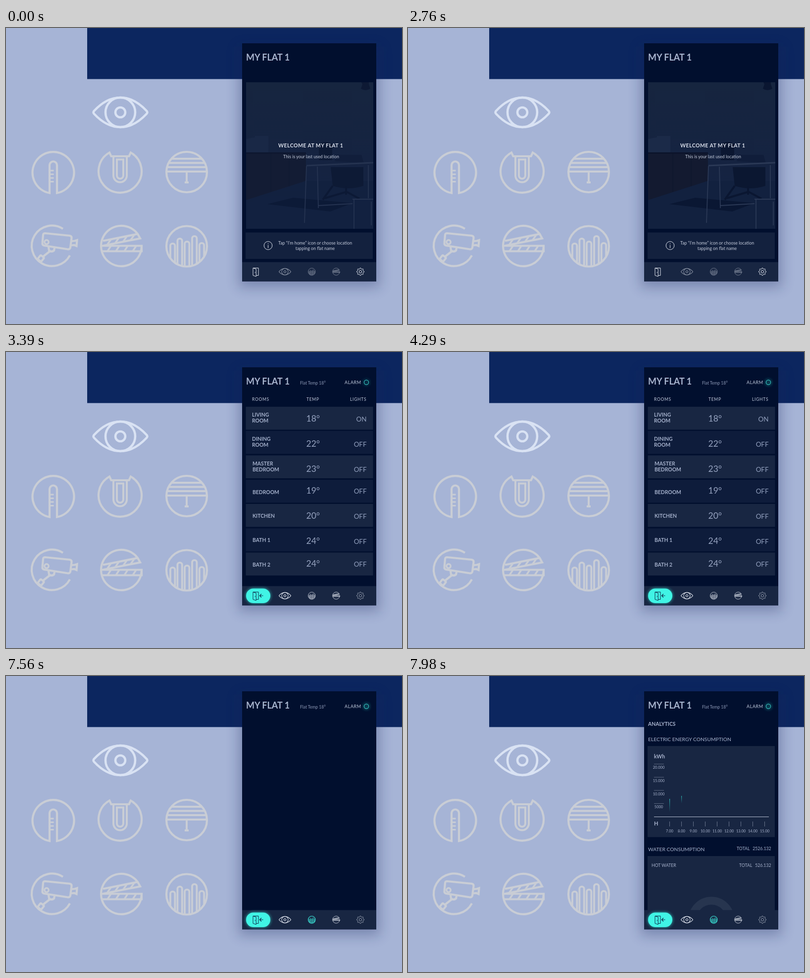
An HTML page for the animation above (8000 ms loop, 800 px wide and 600 px high).

```html
<!DOCTYPE html>
<html lang="en">
<head>
<meta charset="utf-8">
<title>Smart flat app</title>
<style>
html, body { margin: 0; width: 100%; height: 100%; overflow: hidden; background: #a6b4d6; }
svg { display: block; width: 800px; height: 600px; }
text { font-family: Lato, sans-serif; fill: #a9b4ce; }
.b { font-weight: 700; }
.mid { text-anchor: middle; }
.end { text-anchor: end; }
.title { font-size: 18px; }
.head { font-size: 8.5px; letter-spacing: .7px; fill: #c3cbdd; }
.room { font-size: 10.4px; fill: #a3afca; }
.temp { font-size: 17.5px; fill: #97a4c1; }
.light { font-size: 13.4px; fill: #919fbd; }
.sub { font-size: 10.3px; }
.small { font-size: 8.7px; }
.tick { font-size: 7.5px; }
.note { font-size: 8.8px; fill: #c6cddd; }
.icon { fill: none; stroke: #c9cdd5; stroke-width: 4.2; }
.nav { fill: none; stroke: #dfe4ee; stroke-width: 4.8; }
.line { fill: none; stroke: #dfe4ee; stroke-width: 1; }
.grow { transform-box: fill-box; transform-origin: 50% 0; }
</style>
</head>
<body>
<svg viewBox="0 0 800 600">
  <defs>
    <g id="eye">
      <path d="M-53 3Q-56 0-53-3Q-28-30 0-30Q28-30 53-3Q56 0 53 3Q28 30 0 30Q-28 30-53 3Z"/>
      <circle r="30"/><circle r="10"/>
    </g>
    <g id="clapper">
      <path d="M41-2A41 41 0 1 1 33-25L38-16L-38-1M33-25L-37-11M-41-1H41V10H-40"/>
      <path d="M-21-14L-28-4M-5-17L-12-7M11-20L4-10M26-23L19-13M-21-1L-28 10M-4-1L-11 10M13-1L6 10M30-1L23 10" stroke-width="3.6"/>
    </g>
    <g id="bars">
      <circle r="41"/>
      <path d="M-33 24V-1a4.7 4.7 0 0 1 9.4 0V33M-18.600 36V-11a4.700 4.700 0 0 1 9.400 0V40M-4 41V-5a4.700 4.700 0 0 1 9.400 0V40M11 39V-16a4.700 4.700 0 0 1 9.400 0V35M25.800 31V-2a4.700 4.700 0 0 1 9.400 0V21" stroke-width="3.8"/>
    </g>
    <g id="door">
      <path d="M499 486.500H510V501.500H505.500M499 486.500L505.300 488.700V503.700L499 501.500ZM503.300 494.500V496.500"/>
    </g>
    <linearGradient id="wall" x2="0" y2="1">
      <stop stop-color="#16253f"/><stop offset=".55" stop-color="#152341"/><stop offset="1" stop-color="#142344"/>
    </linearGradient>
    <linearGradient id="fade" x2="0" y2="1">
      <stop stop-color="#2fb5b3"/><stop offset="1" stop-color="#2fb5b3" stop-opacity="0"/>
    </linearGradient>
    <filter id="soft" x="-30%" y="-30%" width="160%" height="160%"><feGaussianBlur stdDeviation="13"/></filter>
    <filter id="glow" x="-50%" y="-50%" width="200%" height="200%"><feGaussianBlur stdDeviation="3"/></filter>
  </defs>

  <rect width="800" height="600" fill="#a6b4d6"/>
  <rect x="164" width="636" height="103.500" fill="#0c265f"/>

  <g class="icon">
    <use href="#eye" x="231" y="171" stroke="#d9e2f3" stroke-width="4.600"/>
    <path d="M88 334.500A42 42 0 1 1 103 334.500V278A7.500 7.500 0 0 0 88 278Z"/>
    <path d="M90 289h6.500m-6.500 7.500h6.500m-6.500 7.500h6.500m-6.500 7.500h6.500" stroke-width="3"/>
    <path d="M209 252.500A43.500 43.500 0 1 0 252 252.500L248.500 260H212.500Z"/>
    <path d="M217 260V299A13.500 13.500 0 0 0 244 299V260M224 266.500H237V299A6.500 6.500 0 0 1 224 299Z" stroke-width="4"/>
    <circle cx="365" cy="292" r="41"/>
    <path d="M335 265H395M329 273.500H401M326 282H404M324 291H406M365 291V312M361 313H369" stroke-width="4"/>
    <path d="M115 407A41 41 0 1 0 129 461"/>
    <path d="M79 416L129 421Q133 422 132.500 426L130 445Q129 449 125 448.500L77 441Q73 440 73.500 436L75 419Q75.500 416 79 416ZM133.500 432L139 431.500L143.500 430L142.500 442L138 440L132 440.500M86 444L87 451Q92 455 97 451L98 446M88 453L74 464"/>
    <circle cx="82" cy="434" r="4.200" stroke-width="3.400"/>
    <rect x="-4.500" y="-5" width="9" height="10" rx="1.500" transform="translate(70.500 467)rotate(38)"/>
    <use href="#clapper" x="233" y="442.500"/>
    <use href="#bars" x="365" y="442.500"/>
  </g>

  <rect x="470" y="38" width="285" height="488" fill="#14235a" opacity=".3" filter="url(#soft)"/>
  <rect x="477" y="31" width="271" height="482.500" fill="#010f2e"/>
  <text class="b title" x="485" y="66">MY FLAT 1</text>

  <g id="welcome">
    <rect x="485" y="110" width="257" height="297" fill="url(#wall)"/>
    <g id="photo">
      <path d="M485 252H606V310L485 349Z" fill="#131a30"/>
      <path d="M485 252H606V255H485Z" fill="#0c142b"/>
      <path d="M535 253V332M572 254V321" stroke="#0c142b"/>
      <path d="M485 225l20-4v31h-20zM503 219h27v33h-27z" fill="#1b2a48"/>
      <path d="M485 349L606 310H742V407H485Z" fill="#12213f"/>
      <path d="M528 357L580 344L700 355L655 372Z" fill="#0a1733"/>
      <path d="M718 110h15v4l3 9q-10 6-19 0l3-9z" fill="#0a1631"/>
      <path d="M632 235q14-8 27 0v33h-27zM656 282h66v38q-30 10-62 0z" fill="#0b1731"/>
      <path d="M687 320v18M688 332l-44 13M688 332l26 14M660 320l-20 28" stroke="#0a1631" stroke-width="4"/>
      <path d="M664 270l4-13h50l5 17z" fill="#101d3a"/>
      <path d="M607 279L742 273" stroke="#2b3956" stroke-width="3"/>
      <path d="M607 280L603 395M629 281L631 365M732 278V345M631 360L700 356M700 347H742M703 348V407M738 352V400" fill="none" stroke="#2b3956" stroke-width="1.800"/>
    </g>
    <rect x="484" y="414.500" width="257" height="53.500" fill="#13213e"/>
    <text class="b mid" x="615.700" y="242" font-size="10.600" letter-spacing=".4" style="fill:#d9deea">WELCOME AT MY FLAT 1</text>
    <text class="mid note" x="616.500" y="264">This is your last used location</text>
    <circle class="line" cx="529.500" cy="441" r="8.300"/>
    <path class="line" d="M529.500 440V446M529.500 436.500V438.200" stroke-width="1.300"/>
    <text class="mid note" x="624.500" y="439">Tap “I’m home” icon or choose location</text>
    <text class="mid note" x="624.500" y="450">tapping on flat name</text>
  </g>

  <g id="status">
    <text x="594" y="66" font-size="8.500" style="fill:#8f9bb8">Flat Temp 18°</text>
    <text x="684" y="64.500" font-size="9" letter-spacing=".6" style="fill:#c3cbdd">ALARM</text>
    <circle id="halo" cx="728" cy="61.500" r="5" fill="none" stroke="#2fd0c8" stroke-width="2" filter="url(#glow)"/>
    <circle cx="728" cy="61.500" r="4.600" fill="none" stroke="#35c3bf" stroke-width="1.200"/>
  </g>

  <g id="heads">
    <text class="head" x="497" y="99">ROOMS</text>
    <text class="head" x="607" y="99">TEMP</text>
    <text class="head" x="695" y="99">LIGHTS</text>
  </g>
  <g id="rows"></g>

  <g id="stats">
    <text class="b" x="485" y="100.500" font-size="10.400">ANALYTICS</text>
    <text class="sub" x="485" y="131.500">ELECTRIC ENERGY CONSUMPTION</text>
    <rect x="484" y="142" width="257" height="184.500" fill="#182642"/>
    <text class="b" x="497" y="166.500" font-size="10.400">kWh</text>
    <path d="M497 285.500H729" stroke="#b4bccf"/>
    <text class="b" x="497" y="303" font-size="11">H</text>
    <g id="axes"></g>
    <rect class="grow" id="bar7" x="528" y="249" width="1.200" height="36" fill="url(#fade)"/>
    <rect class="grow" id="bar8" x="552" y="243" width="1.200" height="42" fill="url(#fade)"/>
    <text class="sub" x="485" y="354.500">WATER CONSUMPTION</text>
    <text class="small" x="664" y="353">TOTAL</text>
    <text class="small end" x="733.500" y="353">2526.132</text>
    <rect x="484" y="365" width="257" height="112" fill="#182642"/>
    <text class="small" x="492" y="387">HOT WATER</text>
    <text class="small" x="669" y="387">TOTAL</text>
    <text class="small end" x="733.500" y="387">526.132</text>
    <path d="M574.500 494A38.500 38.500 0 0 1 651.500 494" fill="none" stroke="#27354f" stroke-width="16"/>
  </g>

  <rect x="477" y="474.500" width="271" height="39" fill="#182642"/>
  <use id="doorOff" class="line" href="#door"/>
  <g id="doorOn">
    <rect x="485" y="479.500" width="49" height="29.500" rx="14.750" fill="#3df0e2" opacity=".75" filter="url(#glow)"/>
    <rect x="485" y="479.500" width="49" height="29.500" rx="14.750" fill="#40f4e5"/>
    <use href="#door" fill="none" stroke="#0b2a4a"/>
    <path id="arrow" d="M519.500 494H513M516 490.500L512.500 494L516 497.500" fill="none" stroke="#0b2a4a" stroke-width="1.200"/>
  </g>
  <g id="tools">
    <use class="nav" href="#eye" transform="translate(563.500 494)scale(.22)"/>
    <use class="nav" id="barsOff" href="#bars" transform="translate(617.700 494)scale(.175)"/>
    <use class="nav" href="#clapper" transform="translate(667 494)scale(.175)"/>
  </g>
  <use id="barsOn" class="nav" style="stroke:#40f4e5;stroke-width:6" href="#bars" transform="translate(617.700 494)scale(.175)"/>
  <g id="gear" class="line" transform="translate(716 494)"><circle r="2.700"/></g>
</svg>

<script>
const LOOP = 8000;
const $ = id => document.getElementById(id);

function add(parent, tag, attrs, text) {
  const el = document.createElementNS('http://www.w3.org/2000/svg', tag);
  for (const k in attrs) el.setAttribute(k, attrs[k]);
  if (text) el.textContent = text;
  parent.append(el);
  return el;
}

// steps: [ms, value, easing to the next step]
function play(el, prop, steps, wrap = v => v) {
  const all = [[0, steps[0][1]], ...steps, [LOOP, steps[steps.length - 1][1]]];
  el.animate(all.map(([ms, v, easing = 'linear']) =>
    ({ offset: ms / LOOP, [prop]: wrap(v), easing })), { duration: LOOP, iterations: Infinity });
}
const fade = (id, ...steps) => play($(id), 'opacity', steps);

// name, top, name baseline, temperature, its baseline, light state, slide distance
const rooms = [
  ['LIVING ROOM', 111, 131, 18, 141, 'ON', 0],
  ['DINING ROOM', 160, 180, 22, 191.5, 'OFF', 69],
  ['MASTER BEDROOM', 209.5, 230, 23, 242.5, 'OFF', 69],
  ['BEDROOM', 259, 287.500, 19, 287, 'OFF', 71],
  ['KITCHEN', 308, 336, 20, 337.500, 'OFF', 87],
  ['BATH 1', 357.500, 385, 24, 388.500, 'OFF', 100],
  ['BATH 2', 406.500, 434.500, 24, 435, 'OFF', 62]
];
const easeOut = 'cubic-bezier(.333,.667,.667,1)';

rooms.forEach(([name, top, base, temp, tempBase, light, slide], i) => {
  const row = add($('rows'), 'g', {});
  $('rows').prepend(row);
  add(row, 'rect', { x: 484.5, y: top, width: 257, height: 46.5, fill: i % 2 ? '#0e1c3b' : '#182642' });
  const lines = name.startsWith('BATH') ? [name] : name.split(' ');
  lines.forEach((s, n) => add(row, 'text', { class: 'b room', x: i < 2 ? 497 : 498, y: base + n * 12.2 }, s));
  add(row, 'text', { class: 'temp', x: 606.5, y: tempBase }, temp + '°');
  add(row, 'text', { class: 'light end', x: 728.5, y: tempBase }, light);
  const start = 2910 + i * 20;
  play(row, 'opacity', [[start, 0], [start + 200, 1], [7440, 1], [7540, 0]]);
  play(row, 'transform', [[2910, -slide, easeOut], [3360, 0]], v => `translateY(${v}px)`);
});

['20.000', '15.000', '10.000', '5000'].forEach((s, i) => {
  const y = 178.5 + i * 26.7;
  add($('axes'), 'path', { d: `M497 ${y}h20`, stroke: '#5c6880' });
  add($('axes'), 'text', { class: 'tick mid', x: 506.5, y: y + 9.8 }, s);
});
for (let h = 7; h < 16; h++) {
  const x = 528.5 + (h - 7) * 24;
  add($('axes'), 'path', { d: `M${x} 295v10`, stroke: '#69758c' });
  add($('axes'), 'text', { class: 'tick mid', x, y: 317 }, h + '.00');
}

let cog = '';
for (let k = 0; k < 32; k++) {
  const a = (k - 1.5) / 32 * 2 * Math.PI, r = k % 4 === 1 || k % 4 === 2 ? 7.6 : 5.7;
  cog += (k ? 'L' : 'M') + (r * Math.cos(a)).toFixed(2) + ' ' + (r * Math.sin(a)).toFixed(2);
}
add($('gear'), 'path', { d: cog + 'Z', 'stroke-linejoin': 'round' });

fade('photo', [1800, .75], [2040, 1]);
fade('welcome', [2880, 1], [3030, 0]);
fade('status', [2940, 0], [3120, 1]);
fade('heads', [2940, 0], [3120, 1], [7440, 1], [7540, 0]);
fade('doorOff', [2880, 1], [3000, 0]);
fade('doorOn', [2910, 0], [3060, 1]);
fade('tools', [2910, .55], [3090, 1]);
fade('gear', [2910, 1], [3090, .6]);
fade('barsOff', [7440, 1], [7530, 0]);
fade('barsOn', [7440, 0], [7530, 1]);
fade('stats', [7590, 0], [7830, 1]);

const pulse = [];
for (let t = 3540, n = 0; t < LOOP; t += 750, n++) pulse.push([t, n % 2 ? .8 : .5, 'ease-in-out']);
fade('halo', ...pulse);

play($('arrow'), 'transform', [[2910, 12, easeOut], [3390, 0]], v => `translateX(${v}px)`);
play($('bar7'), 'transform', [[7890, 0], [7980, .75]], v => `scaleY(${v})`);
play($('bar8'), 'transform', [[7935, 0], [7980, .36]], v => `scaleY(${v})`);
</script>
</body>
</html>
```
